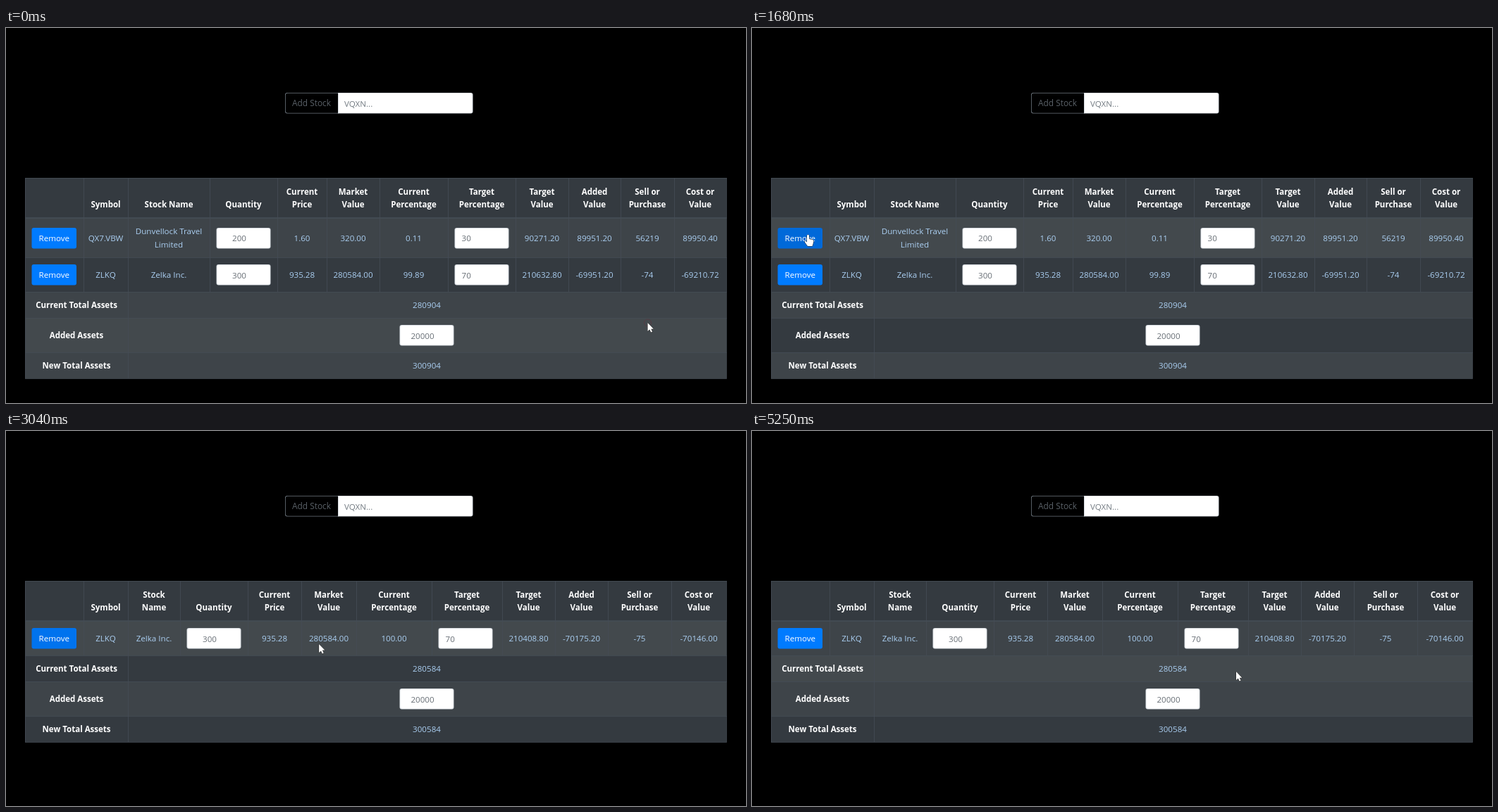
An HTML page with a canvas that plays this animation: 1050x533 px, repeating every 5420 ms.

```html
<!DOCTYPE html>
<html lang="en">
<head>
<meta charset="utf-8">
<title>Portfolio balancer</title>
<style>
  html, body { margin: 0; width: 100%; height: 100%; overflow: hidden; background: #000; }
  canvas { display: block; }
</style>
</head>
<body>
<canvas id="stage" width="1050" height="533"></canvas>
<script>
const ctx = document.getElementById('stage').getContext('2d');
const LOOP = 5420, REMOVED_AT = 2430;
const LEFT = 27, RIGHT = 1022, TOP = 213, BODY = 269, HAIR = .8;
const FACE = '"Open Sans", "Noto Sans", sans-serif';
const REGULAR = '11.6px ' + FACE, BOLD = 'bold 11.5px ' + FACE;
const DARK = '#343a40', STRIPE = '#3e4449', HOVER = '#43494d', LINE = '#454d55', BLUE = '#abcff2';
const ADDED = 20000;

const travel = { symbol: 'QX7.VBW', name: 'Dunvellock Travel|Limited', quantity: 200, price: 1.6, target: 30 };
const motors = { symbol: 'ZLKQ', name: 'Zelka Inc.', quantity: 300, price: 935.28, target: 70 };

// Works out every cell, row edge and total of a portfolio
function portfolio(stocks, nameHead, edges) {
  const total = stocks.reduce((sum, s) => sum + s.quantity * s.price, 0), sum = total + ADDED;
  const heights = [...stocks.map(s => s.name.includes('|') ? 56 : 49), 37, 49, 37];
  let y = BODY + 1;
  const rows = [BODY + 1, ...heights.map(h => y += h)];
  const cells = stocks.map(({ symbol, name, quantity, price, target }) => {
    const value = quantity * price, goal = sum * target / 100, change = goal - value;
    const trade = Math.trunc(change / price);
    const money = [price, value, 100 * value / total].map(n => n.toFixed(2));
    return [symbol, name, quantity, ...money, target, goal.toFixed(2), change.toFixed(2),
      trade, (trade * price).toFixed(2)].map(String);
  });
  const heads = ['Symbol', nameHead, 'Quantity', 'Current|Price', 'Market|Value', 'Current|Percentage',
    'Target|Percentage', 'Target|Value', 'Added|Value', 'Sell or|Purchase', 'Cost or|Value'];
  const cols = [LEFT, 110, 173, ...edges, RIGHT];
  return { cells, rows, heads, cols, total: total.toFixed(0), sum: sum.toFixed(0) };
}
const before = portfolio([travel, motors], 'Stock Name', [289, 385, 455, 530, 627, 723, 798, 872, 948]);
const after = portfolio([motors], 'Stock|Name', [247, 343, 419, 497, 604, 704, 779, 854, 944]);

// Pointer moves: start, end, x, y; it rests in between
const moves = [
  [210, 290, 890, 387], [430, 710, 586, 283], [710, 1270, 220, 338], [1270, 1680, 80, 294],
  [2750, 2980, 290, 328], [2980, 3040, 443, 303], [3040, 3140, 555, 295],
  [4250, 4850, 700, 366], [4850, 5110, 668, 322], [5180, 5250, 687, 342]
];
const clicks = [-215, 2360, 3360, 4040];

const ramp = (t, from, to) => Math.min(1, Math.max(0, (t - from) / (to - from)));

function pointerAt(t) {
  let x = 910.5, y = 419;
  for (const [start, end, toX, toY] of moves) {
    const k = ramp(t, start, end);
    x += (toX - x) * k;
    y += (toY - y) * k;
  }
  return [x, y];
}

function fill(x, y, w, h, color) {
  ctx.fillStyle = color;
  ctx.fillRect(x, y, w, h);
}

function box(x, y, w, color, border = color, radii = 3) {
  const h = 29.5;
  ctx.beginPath();
  ctx.roundRect(x, y, w, h, radii);
  ctx.fillStyle = border;
  ctx.fill();
  ctx.beginPath();
  ctx.roundRect(x + HAIR, y + HAIR, w - 2 * HAIR, h - 2 * HAIR, radii);
  ctx.fillStyle = color;
  ctx.fill();
}

function text(str, x, y, color = BLUE, font = REGULAR, align = 'center') {
  ctx.font = font;
  ctx.textAlign = align;
  ctx.fillStyle = color;
  ctx.fillText(str, x, y + 4.2);
}

function lines(str, x, y, ...style) {
  str.split('|').forEach((part, i) => text(part, x, y + i * 18.4, ...style));
}

function input(value, x, mid, align = 'center') {
  box(x, Math.round(mid - 14.5), 77, '#fff', '#ced4da');
  text(value, x + (align === 'center' ? 32.5 : 10), mid + 1, '#666d74', REGULAR, align);
}

function searchBar() {
  box(396, 92, 76, '#000', '#6c757d', [3, 0, 0, 3]);
  text('Add Stock', 433.5, 107, '#596067', '11.9px ' + FACE);
  box(471, 92, 191.5, '#fff', '#ced4da', [0, 3, 3, 0]);
  text('VQXN...', 480, 107.5, '#747c83', REGULAR, 'left');
}

function stockRow(cells, cols, mid, hover) {
  box(36.5, Math.round(mid - 14.5), 63.5, `rgb(0,${123 - 18 * hover},${255 - 38 * hover})`);
  text('Remove', 68.3, mid + .4, '#fff');
  cells.forEach((cell, i) => {
    const left = cols[i + 1], x = (left + cols[i + 2]) / 2;
    if (i === 2) input(cell, left + 9.5, mid);
    else if (i === 6) input(cell, left + 9.5, mid, 'left');
    else lines(cell, x, mid + .4 - (cell.includes('|') ? 9.2 : 0));
  });
}

function table({ cells, rows, heads, cols, total, sum }, pointerY, buttonHover) {
  const count = cells.length, bottom = rows[rows.length - 1];
  fill(LEFT, TOP, RIGHT - LEFT, bottom - TOP, DARK);
  for (let i = 0; i < rows.length - 1; i++) {
    const hovered = pointerY >= rows[i] && pointerY < rows[i + 1];
    fill(LEFT, rows[i], RIGHT - LEFT, rows[i + 1] - rows[i], hovered ? HOVER : i % 2 ? DARK : STRIPE);
  }
  [TOP, BODY, ...rows].forEach(y => fill(LEFT, y, RIGHT - LEFT + HAIR, HAIR, LINE));
  cols.forEach((x, i) => fill(x, TOP, HAIR, ([0, 2, 12].includes(i) ? bottom : rows[count]) - TOP, LINE));

  heads.forEach((head, i) =>
    lines(head, (cols[i + 1] + cols[i + 2]) / 2, head.includes('|') ? 232.5 : 250.9, '#fff', BOLD));
  const mid = i => (rows[i] + rows[i + 1]) / 2;
  cells.forEach((row, i) => stockRow(row, cols, mid(i), i ? 0 : buttonHover));
  ['Current Total Assets', 'Added Assets', 'New Total Assets'].forEach((label, i) => {
    const y = mid(count + i) + .4;
    text(label, 100, y, '#fff', BOLD);
    if (i === 1) input(ADDED, 558.5, mid(count + i));
    else text(i ? sum : total, 597, y);
  });
}

function ring(t, x, y) {
  const age = t - clicks.findLast(start => start <= t);
  if (age > 240) return;
  ctx.beginPath();
  ctx.arc(x, y, 24.5 - .09 * age, 0, 7);
  ctx.lineWidth = Math.max(.6, 4 - .025 * age);
  ctx.strokeStyle = `rgba(136,20,40,${.85 - .002 * age})`;
  ctx.stroke();
}

const arrow = new Path2D('M0 0V12L2.8 9.5 4.6 13.6 6.6 12.7 4.8 8.7H8.3Z');
const hand = new Path2D('M-2 1Q-.5-1.5 1 1V6L6 7Q7.5 7.3 7.3 9.5L6.5 13 5.5 16H-1L-5 10.5Q-5.5 8.5-3.5 9L-2 10.5Z');

function pointer(t, x, y) {
  if (t > 3130 && t < 4260) return; // text caret, lost among the digits
  const shape = x > 37 && x < 100 && y > 280 && y < 313 ? hand : arrow;
  ctx.save();
  ctx.translate(x, y);
  ctx.lineWidth = 1;
  ctx.strokeStyle = '#222';
  ctx.fillStyle = '#fff';
  ctx.stroke(shape);
  ctx.fill(shape);
  ctx.restore();
}

function draw(now) {
  const t = now % LOOP, [x, y] = pointerAt(t), removed = t >= REMOVED_AT;
  const buttonHover = removed ? ramp(t, 2750, 2900) - ramp(t, 2960, 3110) : ramp(t, 1540, 1680);
  fill(0, 0, 1050, 533, '#000');
  searchBar();
  table(removed ? after : before, y, buttonHover);
  ring(t, x, y);
  pointer(t, x, y);
  requestAnimationFrame(draw);
}
requestAnimationFrame(draw);
</script>
</body>
</html>
```
